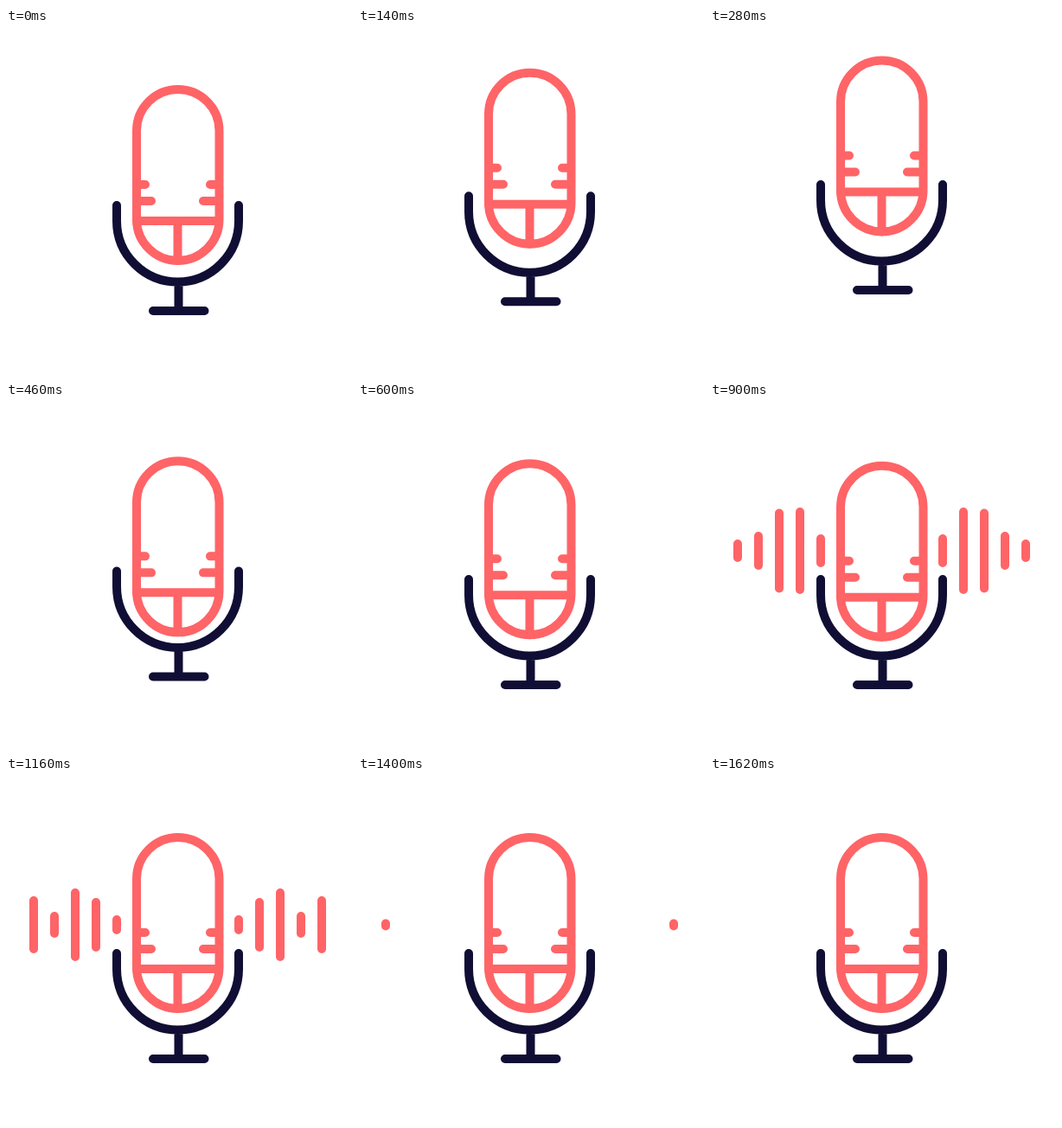
Recreate the animation shown at these times as an HTML page. Size 400 by 400 pixels, loop 1.64 s.

```html
<!DOCTYPE html>
<html>
<head>
<meta charset="utf-8">
<style>
  html, body { margin: 0; width: 100%; height: 100%; overflow: hidden; background: #fff; }
  svg { display: block; width: 100%; height: 100%; }
  g { fill: none; stroke-width: 10; stroke-linecap: round; stroke-linejoin: round; }
  .coral { stroke: #ff6467; }
  .navy { stroke: #100e34; }
</style>
</head>
<body>
<svg viewBox="0 0 400 400">
  <g class="navy" id="stand">
    <path d="M128 205V223A70.5 70.5 0 0 0 269 223V205M199.5 294V327M170 327H229.5"/>
  </g>
  <g class="coral" id="mic">
    <rect x="151" y="71" width="95.5" height="198" rx="47.75"/>
    <path d="M151 223H246M198.5 223V269M151 181H161M151 200H168M246 181H236M246 200H228"/>
  </g>
  <g class="coral"><path id="bars"/></g>
</svg>
<script>
const LOOP = 1640, CENTER_Y = 172;
const $ = id => document.getElementById(id);

// [time, value] pairs
const micKeys = [[0, 0], [260, -34], [530, 3], [680, -3], [870, 3], [1060, 0]];
const standKeys = [[20, 0], [280, -24], [600, 0]];

// Half heights at 740, 900 and 1160 ms, from the innermost bar outwards
const barKeys = [
  [11, 19, 11], [22, 50, 31], [34, 48.5, 42], [39, 22, 15], [15.5, 13, 33]
].map(([a, b, c], i) =>
  [[560 + i * 15, 0], [740, a], [900, b], [1160, c], [1440 + i * 15, 0]]);

function valueAt(keys, t) {
  if (t <= keys[0][0]) return keys[0][1];
  for (let i = 1; i < keys.length; i++) {
    const [t0, v0] = keys[i - 1], [t1, v1] = keys[i];
    if (t < t1) return v0 + (v1 - v0) * (1 - Math.cos(Math.PI * (t - t0) / (t1 - t0))) / 2;
  }
  return keys[keys.length - 1][1];
}

function draw(now) {
  const t = now % LOOP;
  $('mic').setAttribute('transform', `translate(0 ${valueAt(micKeys, t)})`);
  $('stand').setAttribute('transform', `translate(0 ${valueAt(standKeys, t)})`);
  let d = '';
  barKeys.forEach((keys, i) => {
    const half = valueAt(keys, t) - 5;
    if (half <= 0) return;
    for (const x of [128 - i * 24, 269 + i * 24])
      d += `M${x} ${CENTER_Y - half}V${CENTER_Y + half}`;
  });
  $('bars').setAttribute('d', d);
}

const start = performance.now();
function tick() {
  draw(performance.now() - start);
  requestAnimationFrame(tick);
}
tick();
</script>
</body>
</html>
```
